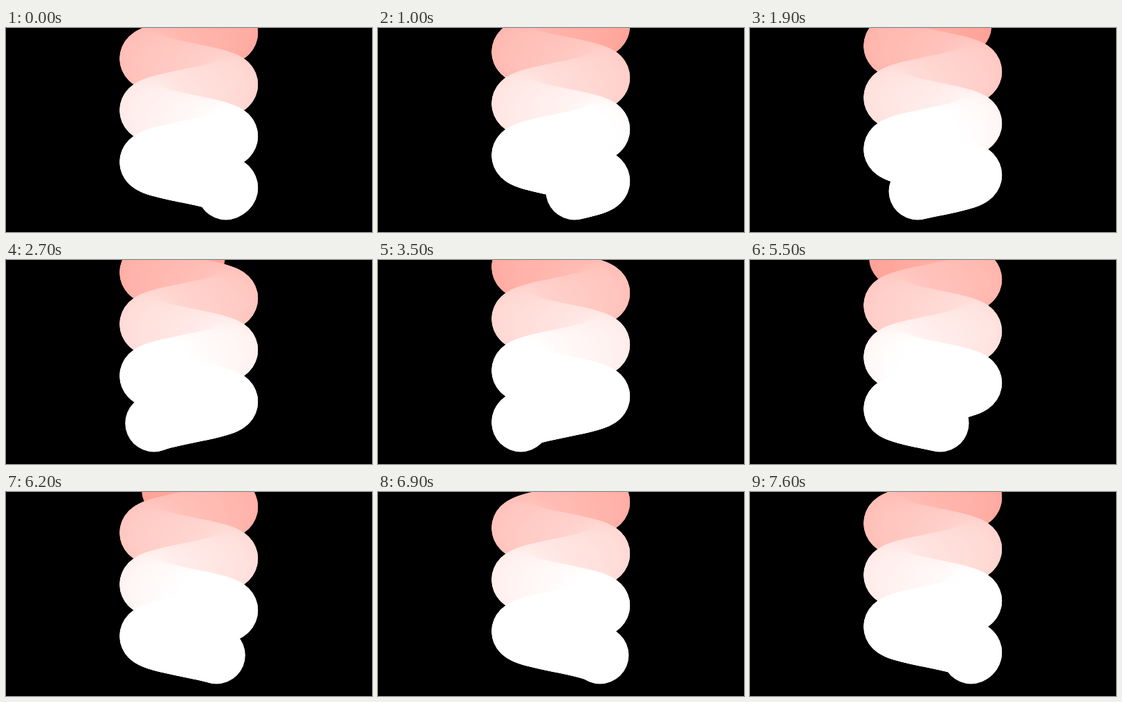
Animation, 529 px wide and 296 px high, one loop 8000 ms. Source, as an HTML page with a canvas:

```html
<!DOCTYPE html>
<html lang="en">
<head>
<meta charset="utf-8">
<title>Swinging trail</title>
<style>
  html, body { margin: 0; width: 100%; height: 100%; overflow: hidden; background: #000; }
  canvas { display: block; }
</style>
</head>
<body>
<canvas id="stage" width="529" height="296"></canvas>
<script>
const ctx = document.getElementById('stage').getContext('2d');
const LOOP = 8000, STEP = 100, LAST = 76;
const PERIOD = 77;          // steps per full swing
const RISE = 75 / PERIOD;   // upward drift per step, px
const TAIL = 246;           // trail length, steps
const RADIUS = 41.6, CENTER = 264.2, SWING = 58.4, HEAD_Y = 236.8;
const RIGHT_TURN = -5;      // step at which the head is furthest right

const headX = step => CENTER + SWING * Math.cos((step - RIGHT_TURN) / PERIOD * 2 * Math.PI);

// White near the head, then fading steadily to coral.
function tint(height) {
  const fade = Math.max(0, height - 79);
  return `rgb(255, ${255 - fade * 0.58}, ${255 - fade * 0.65})`;
}

function draw(step) {
  ctx.fillStyle = '#000';
  ctx.fillRect(0, 0, 529, 296);
  for (let age = TAIL; age >= 0; age--) {
    const height = age * RISE;
    ctx.fillStyle = tint(height);
    ctx.beginPath();
    ctx.arc(headX(step - age), HEAD_Y - height, RADIUS, 0, 2 * Math.PI);
    ctx.fill();
  }
}

let shown = -1;
function tick() {
  const step = Math.min(LAST, Math.floor(performance.now() % LOOP / STEP));
  if (step !== shown) draw(shown = step);
  requestAnimationFrame(tick);
}
tick();
</script>
</body>
</html>
```
